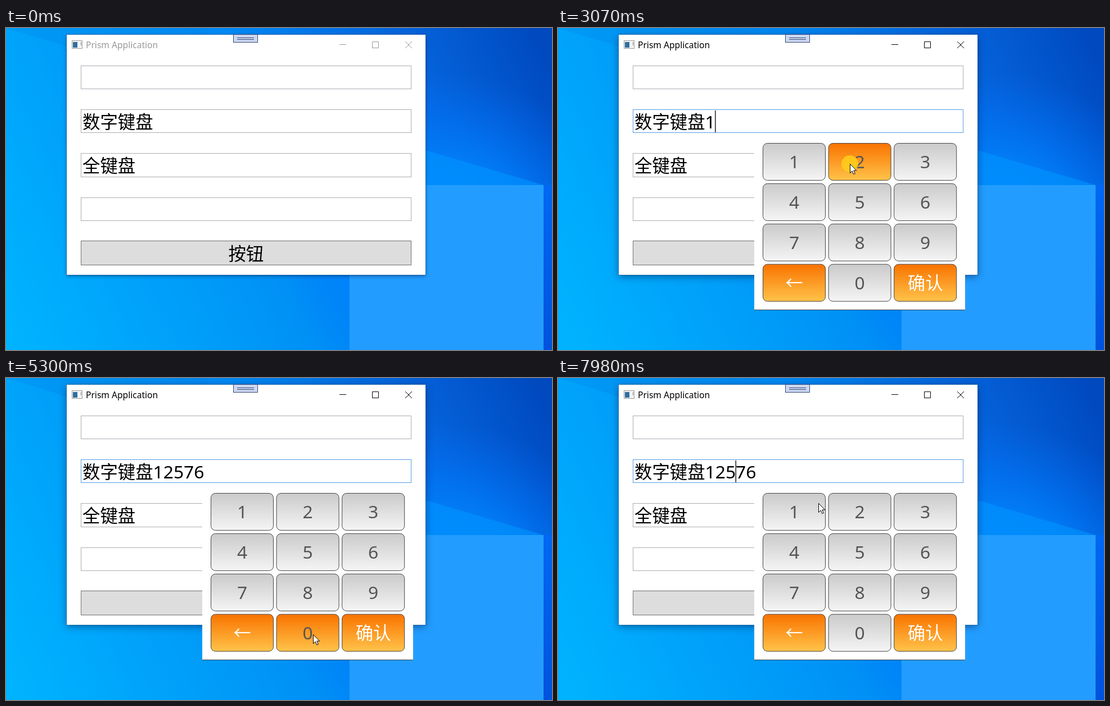
Write an HTML page that moves like this. It is 971 px wide and 574 px high and loops after 8000 ms.

```html
<!DOCTYPE html>
<html lang="zh">
<head>
<meta charset="utf-8">
<title>Keypad</title>
<style>
  html, body { margin: 0; width: 100%; height: 100%; overflow: hidden; background: #0090f8; }
  svg { display: block; width: 971px; height: 574px; }
  text { font: 31.4px "Noto Sans CJK SC", "Noto Sans CJK", sans-serif; white-space: pre; }
  .num { font: 31.8px "Noto Sans", "Open Sans", sans-serif; }
  .title { font: 15.6px "Noto Sans", "Open Sans", sans-serif; }
  .mid { text-anchor: middle; }
  .field { fill: #fff; stroke: #abadb3; }
  .hover { stroke: #7eb4ea; }
  .focus { stroke: #569de5; }
  .button { fill: #ddd; stroke: #707070; }
  .button.hover { fill: #bee6fd; stroke: #3c7fb1; }
  .key { fill: url(#gray); stroke: #444; }
  .key.hot { fill: url(#orange); }
  #win { filter: drop-shadow(0 2px 3px rgba(0, 20, 60, .5)); }
  #win.active { filter: drop-shadow(0 3px 7px rgba(0, 20, 60, .5)); }
  #chrome { color: #999; }
  #chrome.active { color: #000; }
</style>
</head>
<body>
<svg id="stage" viewBox="0 0 971 574">
  <defs>
    <linearGradient id="sky" gradientUnits="userSpaceOnUse" x1="0" y1="520" x2="971" y2="70">
      <stop offset="0" stop-color="#00b3ff"/>
      <stop offset=".3" stop-color="#009cf8"/>
      <stop offset=".55" stop-color="#0088f4"/>
      <stop offset=".8" stop-color="#0564dc"/>
      <stop offset="1" stop-color="#0049bf"/>
    </linearGradient>
    <radialGradient id="glow" gradientUnits="userSpaceOnUse" cx="790" cy="380" r="300">
      <stop offset="0" stop-color="#0090ff"/>
      <stop offset=".5" stop-color="#0084ff" stop-opacity=".7"/>
      <stop offset="1" stop-color="#0070ff" stop-opacity="0"/>
    </radialGradient>
    <linearGradient id="edge" x1="0" y1="0" x2="0" y2="1">
      <stop offset="0" stop-color="#0068f4"/>
      <stop offset="1" stop-color="#0052dc"/>
    </linearGradient>
    <linearGradient id="gray" x1="0" y1="0" x2="0" y2="1">
      <stop offset="0" stop-color="#cacaca"/>
      <stop offset="1" stop-color="#f5f5f5"/>
    </linearGradient>
    <linearGradient id="orange" x1="0" y1="0" x2="0" y2="1">
      <stop offset="0" stop-color="#f97300"/>
      <stop offset="1" stop-color="#ffc34a"/>
    </linearGradient>
  </defs>

  <rect width="971" height="574" fill="url(#sky)"/>
  <path d="M0 0H360V12H108V33Z" fill="#0078e0" opacity=".2"/>
  <rect x="500" width="471" height="574" fill="url(#glow)"/>
  <path d="M740 216L956 280V320H740Z" fill="#0094ff" opacity=".6"/>
  <rect x="956" y="280" width="15" height="294" fill="url(#edge)"/>
  <rect x="611" y="280" width="345" height="345" fill="#229dff"/>

  <rect id="win" x="108" y="12" width="638" height="428" fill="#fff"/>
  <rect x="107.5" y="11.5" width="639" height="429" fill="none" stroke="#1c5c96" opacity=".55"/>
  <g id="chrome">
    <text class="title" x="142" y="36" fill="currentColor">Prism Application</text>
    <path d="M593 29.5H605M651.5 24.5H662.5V35.5H651.5ZM710 24L722 36M722 24L710 36"
      fill="none" stroke="currentColor"/>
  </g>
  <rect x="117.500" y="22.500" width="18" height="14" fill="#f4f4f4" stroke="#9a9a9a"/>
  <rect x="119" y="25" width="8" height="10" fill="#2f6f9f"/>
  <path d="M133.500 25V31" stroke="#888"/>
  <rect x="404.500" y="11.500" width="43" height="14" fill="#ccd8f2" stroke="#34456f"/>
  <path d="M411 17.500H441M411 20.500H441" stroke="#34456f"/>

  <g id="form"></g>
  <text x="136" y="179">数字键盘</text>
  <text x="136" y="257">全键盘</text>
  <text class="mid" x="427" y="414">按钮</text>
  <text id="typed" class="num" x="261.500" y="178.500"></text>
  <rect id="caret" y="147" width="1.300" height="39"/>

  <g id="pad">
    <rect x="349" y="188" width="375" height="315" fill="#fff"/>
    <path d="M349 502.500H724" stroke="#454545"/>
  </g>
  <circle id="click" r="15" fill="#ffd21a" opacity=".8"/>
  <path id="arrow" d="M.5 .5V16.500L4.200 13L6.800 18.700L9.300 17.600L6.800 12H11.700Z" fill="#fff" stroke="#000"/>
  <path id="beam" d="M-3.500 -7.500H-1L0 -6.500L1 -7.500H3.500M0 -6.500V6.500M-3.500 7.500H-1L0 6.500L1 7.500H3.500"
    fill="none" stroke="#222"/>
</svg>
<script>
const LOOP = 8000, DIGIT = 18.2, TEXT_X = 261.5, BLINK = 530;
const $ = id => document.getElementById(id);

function add(parent, tag, attrs, label) {
  const el = document.createElementNS('http://www.w3.org/2000/svg', tag);
  for (const k in attrs) el.setAttribute(k, attrs[k]);
  if (label) el.textContent = label;
  parent.append(el);
  return el;
}

const fields = [[67.5, 41], [145.5, 41], [223.5, 42], [302.5, 41], [379.5, 43]].map(([y, h], i) => ({
  y, h,
  el: add($('form'), 'rect', { x: 133.5, y, width: 587, height: h, class: i < 4 ? 'field' : 'button' })
}));

const keys = {};
['1', '2', '3', '4', '5', '6', '7', '8', '9', '←', '0', '确认'].forEach((label, i) => {
  const x = 364.5 + i % 3 * 116.6, y = 205.5 + Math.floor(i / 3) * 71.9;
  const digit = label >= '0' && label <= '9';
  keys[label] = add($('pad'), 'rect', {
    x, y, width: 111, height: 66, rx: 8, class: digit ? 'key' : 'key hot'
  });
  add($('pad'), 'text', {
    x: x + 55.5, y: y + (digit ? 44.5 : 45), class: digit ? 'mid num' : 'mid',
    fill: digit ? '#555' : '#fff', 'font-size': 30.5
  }, label);
});

// Pointer path: time, x, y
const path = [
  [300, 430, 493], [1060, 351, 174.5], [2060, 351, 174.5], [2320, 434, 303],
  [2480, 430, 248], [2640, 430, 248], [2800, 469, 243], [2870, 469, 243],
  [2980, 519, 242], [3120, 519, 242], [3210, 526, 293], [3350, 526, 293],
  [3420, 528, 305], [3530, 528, 305], [3690, 432, 383], [3830, 432, 383],
  [4130, 614, 302], [4220, 614, 302], [4320, 624, 310], [4490, 624, 310],
  [4760, 590, 422], [5020, 590, 422], [5180, 546, 457], [5400, 546, 457],
  [5710, 443, 450], [5910, 443, 450], [5980, 438, 450], [6240, 438, 450],
  [6500, 424, 450], [7050, 424, 450], [7250, 349, 174], [7390, 349, 174],
  [7580, 318, 165], [7760, 318, 165], [7980, 463, 223]
];

// Key presses: label, down, up
const presses = [
  ['1', 2500, 2640], ['2', 3010, 3180], ['5', 3430, 3530], ['7', 3730, 3830],
  ['6', 4350, 4490], ['0', 5220, 5380], ['←', 6780, 6920]
];

// Click highlights: start, end
const clicks = [[1660, 1725], [7710, 7790], ...presses.map(([, d, u]) => [d - 60, u - 90])];

const during = (t, a, b) => t >= a && t < b;
const show = (el, on) => el.setAttribute('visibility', on ? 'visible' : 'hidden');
const moveTo = (el, x, y) => el.setAttribute('transform', `translate(${x} ${y})`);

function pointer(t) {
  const i = path.findIndex(p => p[0] > t);
  if (i < 0) return path[path.length - 1].slice(1);
  if (!i) return path[0].slice(1);
  const [t0, x0, y0] = path[i - 1], [t1, x1, y1] = path[i];
  const u = (t - t0) / (t1 - t0), e = u * u * (3 - 2 * u);
  return [x0 + (x1 - x0) * e, y0 + (y1 - y0) * e];
}

function draw(t) {
  const active = t >= 1660, open = t >= 1730;
  const [x, y] = pointer(t);

  let text = '', reset = 1660;
  for (const [label, , up] of presses) {
    if (t < up) break;
    text = label === '←' ? text.slice(0, -1) : text + label;
    reset = up;
  }
  let pos = text.length;
  if (t >= 7720) { pos = 3; reset = 7720; }

  $('win').classList.toggle('active', active);
  $('chrome').classList.toggle('active', active);
  show($('pad'), open);
  $('typed').textContent = text;
  $('caret').setAttribute('x', TEXT_X + pos * DIGIT - .5);
  show($('caret'), active && (t - reset) % (2 * BLINK) < BLINK);

  let beam = false;
  fields.forEach((f, i) => {
    const over = t >= 300 && x > 133 && x < 721 && y > f.y && y < f.y + f.h && (!open || i < 2);
    beam = beam || over && i < 4;
    f.el.classList.toggle('hover', over);
    f.el.classList.toggle('focus', active && i === 1);
  });

  for (const label in keys) {
    const pressed = presses.some(([k, d, u]) => k === label && during(t, d, u));
    keys[label].classList.toggle('hot', pressed || label === '←' || label === '确认');
  }

  const px = Math.round(x), py = Math.round(y);
  moveTo($('arrow'), px, py);
  moveTo($('beam'), px + .5, py);
  moveTo($('click'), px, py);
  show($('arrow'), t >= 300 && !beam);
  show($('beam'), t >= 300 && beam);
  show($('click'), clicks.some(([a, b]) => during(t, a, b)));
}

const start = performance.now();
function tick() {
  draw((performance.now() - start) % LOOP);
  requestAnimationFrame(tick);
}
tick();
</script>
</body>
</html>
```
